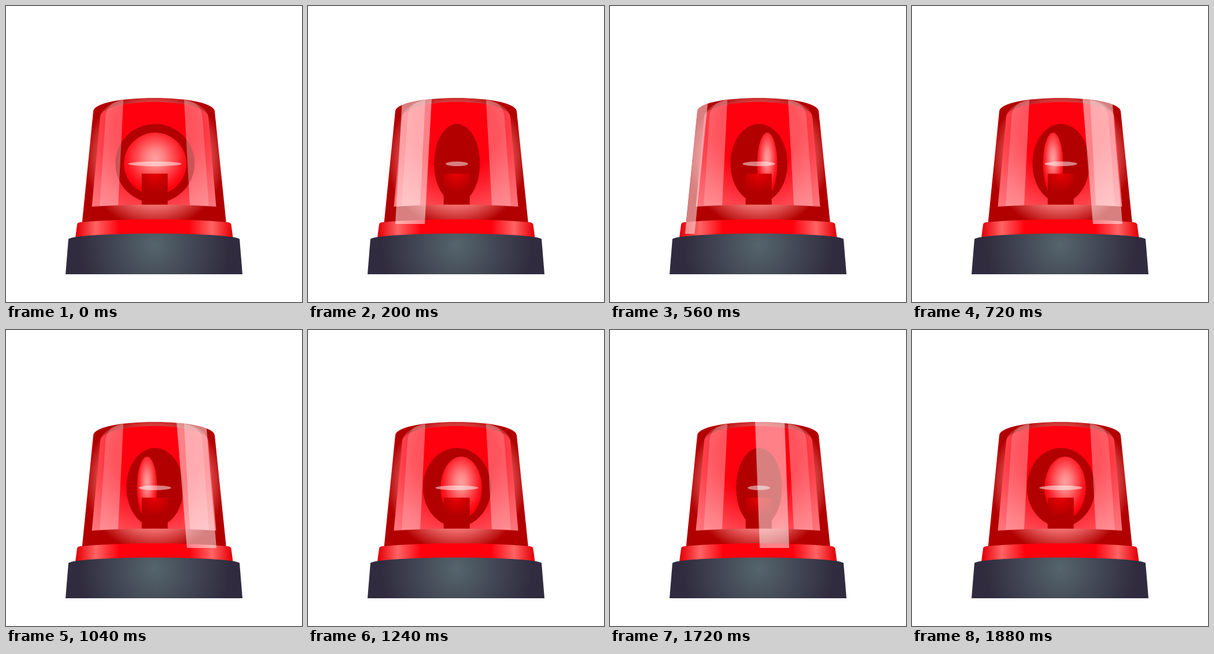
Write an HTML page with a canvas that moves like this. It is 512 px wide and 512 px high and loops after 1920 ms.

```html
<!DOCTYPE html>
<html lang="en">
<head>
<meta charset="utf-8">
<title>Beacon</title>
<style>
  html, body { margin: 0; width: 100%; height: 100%; overflow: hidden; background: #fff; }
  canvas { display: block; width: 100vmin; height: 100vmin; }
</style>
</head>
<body>
<canvas id="stage" width="512" height="512"></canvas>
<script>
const ctx = document.getElementById('stage').getContext('2d');
const STEP = 40, TURN = 8, MID = 257;

const dome = new Path2D(
  'M151 182 C152 168 200 159 257 159 C312 159 360 168 361 182 L383.5 394 H130 Z');
const shell = new Path2D(
  'M151 182 C152 168 200 159 257 159 C312 159 360 168 361 182 L381 376 H131.5 Z');
const glass = new Path2D(
  'M163 192 C164 175 212 166 257 166 C302 166 349 175 350 192 L363.5 347 Q257 340 148.5 347 Z');
const stripes = new Path2D(
  'M172 194 C173 174 184 165 203 162.5 L194 344.5 L162 346 Z ' +
  'M340 194 C339 174 328 165 308 162.5 L318 344.5 L351 346 Z');
const sides = new Path2D(
  'M163 192 C164 179 182 166 203 162.5 L194 344.5 L148.5 347 Z ' +
  'M350 192 C349 179 331 166 308 162.5 L318 344.5 L363.5 347 Z');
const ring = new Path2D(
  'M123 378 Q123 375 128 374 Q190 369 257 369 Q322 369 384 374 Q389 375 389.5 378 L393 404 H119.5 Z');
const base = new Path2D(
  'M108 403 C116 397 190 393.5 257 393.5 C322 393.5 396 397 404 403 L409 464 H103 Z');

function stops(g, list) {
  for (const [at, color] of list) g.addColorStop(at, color);
  return g;
}

function radial(x, y, r, list) {
  return stops(ctx.createRadialGradient(x, y, 0, x, y, r), list);
}

const shellFill = radial(MID, 264, 130,
  [[0, '#ff8080'], [0.62, '#f07070'], [0.94, '#b20000'], [1, '#b20000']]);
const glassFill = radial(MID, 215, 175,
  [[0, '#ff0010'], [0.4, '#ff000e'], [0.75, '#ff404a'], [1, '#ff6068']]);
const stemFill = radial(MID, 290, 32, [[0, '#e80004'], [1, '#b20000']]);
const baseFill = radial(MID, 413, 132, [[0, '#55656c'], [1, '#302b3e']]);
const ringFill = stops(ctx.createLinearGradient(120, 0, 392, 0), [
  [0, '#dc0008'], [0.04, '#ee1a20'], [0.13, '#ff6464'], [0.28, '#ff000c'],
  [0.72, '#ff000c'], [0.87, '#ff6464'], [0.96, '#ee1a20'], [1, '#dc0008']]);

function fill(path, style) {
  ctx.fillStyle = style;
  ctx.fill(path);
}

function oval(x, y, rx, ry, style) {
  ctx.save();
  ctx.translate(x, y);
  ctx.scale(rx, ry);
  ctx.beginPath();
  ctx.arc(0, 0, 1, 0, Math.PI * 2);
  ctx.fillStyle = style;
  ctx.fill();
  ctx.restore();
}

const bulbFill = radial(0, -0.18, 1.1,
  [[0, '#ffa0a0'], [0.25, '#ff8484'], [0.8, '#ff1822'], [1, '#ff000c']]);

// swing: distance from the front view, -4..4
function drawLamp(swing) {
  const away = Math.abs(swing);
  oval(257.7, 272.3, 68.5 - 9.6 * away, 68.3, '#b20000');
  const rx = 54 - 18.3 * away;
  if (rx > 0) oval(258 - 7 * swing, 272.8, rx, 53.7, bulbFill);
  ctx.fillStyle = stemFill;
  ctx.fillRect(234.7, 290, 45, 53.5);
  oval(257.5, 273, 46.3 - 9 * away, 4, 'rgba(255,255,255,.5)');
}

// The sweeping beam moves left while its slant follows the dome.
function drawBeam(phase) {
  const top = 383 - 44 * phase, low = 421 - 54 * phase;
  const atEdge = phase === 1 || phase === 6;
  const y = atEdge ? 394 : 377;
  const lean = (low - top) / 218 * (y - 377);
  ctx.save();
  ctx.clip(dome);
  ctx.beginPath();
  ctx.moveTo(top, 159);
  ctx.lineTo(top + 51, 159);
  ctx.lineTo(low + 51 + lean, y);
  ctx.lineTo(low + lean, y);
  ctx.fillStyle = 'rgba(255,255,255,.5)';
  ctx.fill();
  ctx.restore();
}

function draw(time) {
  const phase = Math.floor(time / STEP) % TURN;
  ctx.fillStyle = '#fff';
  ctx.fillRect(0, 0, 512, 512);
  fill(shell, shellFill);
  fill(glass, glassFill);
  drawLamp(phase > 4 ? phase - TURN : phase);
  fill(sides, 'rgba(255,255,255,.16)');
  fill(stripes, 'rgba(255,255,255,.2)');
  fill(ring, ringFill);
  drawBeam(phase);
  fill(base, baseFill);
}

const start = performance.now();
function tick() {
  draw(performance.now() - start);
  requestAnimationFrame(tick);
}
tick();
</script>
</body>
</html>
```
